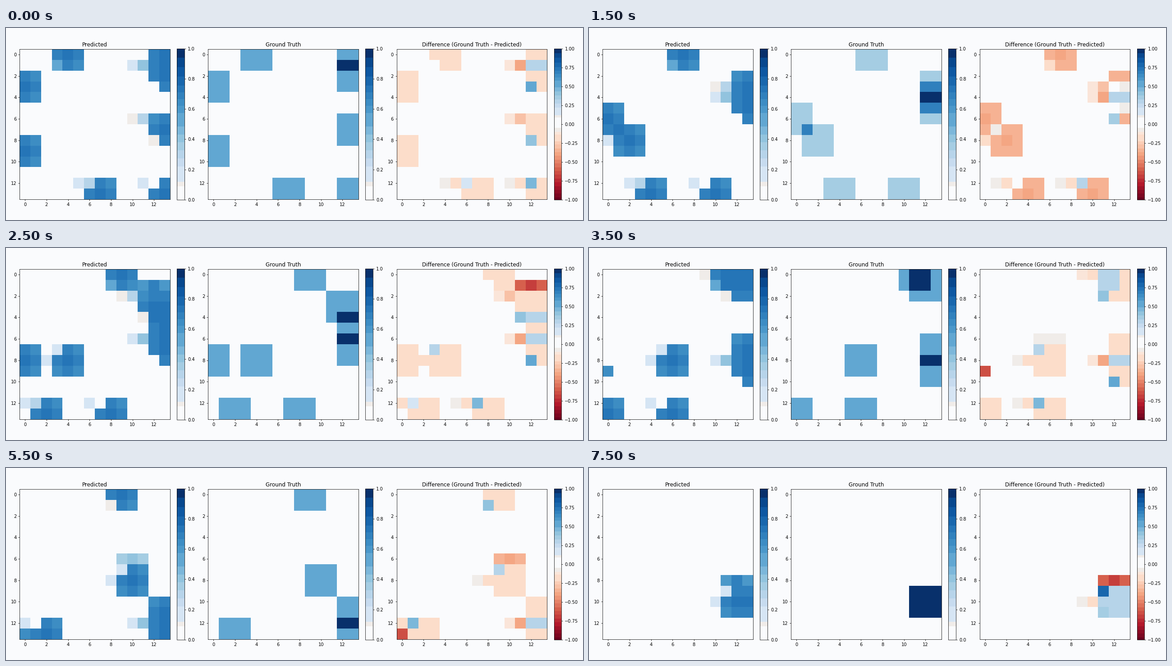
A matplotlib script that plays this animation: 1280 px wide and 427 px high, repeating every 8 s.

```python
import numpy as np
import matplotlib.pyplot as plt
from matplotlib.animation import FuncAnimation
from matplotlib.colors import ListedColormap

W, H, DPI = 1280, 427, 64
FRAMES, STEP_MS, N = 16, 500, 14
PT = 10 / 9  # size of one layout point at this dpi
PAPER = np.array([250, 251, 253]) / 255
GREY = np.array([240, 236, 233]) / 255

plt.rcParams.update({
    "font.family": "DejaVu Sans", "font.size": 10 * PT,
    "axes.titlesize": 12 * PT, "axes.titlepad": 6 * PT,
    "axes.linewidth": 0.8 * PT,
})
for axis in ("xtick", "ytick"):
    plt.rcParams.update({f"{axis}.major.size": 3.5 * PT,
                         f"{axis}.major.width": 0.8 * PT,
                         f"{axis}.major.pad": 3.5 * PT})

# Stepped colours: blue for positive values, red for negative ones.
BLUE_EDGES = np.r_[0, .09, .118, np.linspace(.22, .485, 6),
                   np.linspace(.575, .755, 5), np.linspace(.816, 1, 4)]
RED_EDGES = np.r_[0, .05, .1, .14, .225, np.arange(.27, 1, .05), 1]


def band_color(v):
    edges = BLUE_EDGES if v >= 0 else RED_EDGES
    i = np.searchsorted(edges, abs(v), side="right") - 1
    if i < 2:
        return (PAPER, GREY)[i]
    mid = 1.0 if i == len(edges) - 2 else (edges[i] + edges[i + 1]) / 2
    rgba = plt.cm.Blues(mid) if v >= 0 else plt.cm.RdBu((1 - mid) / 2)
    return np.array(rgba[:3])


def stepped_cmap(lo, hi, n=1000):
    mids = lo + (np.arange(n) + .5) * (hi - lo) / n
    return ListedColormap([band_color(v) for v in mids])


class Mover:
    """A 3x3 block on a path of (step, x, y) and the forecast errors around it.

    weak: (dx, dy, value) of a badly forecast corner
    wake: (dy, value) of a fading streak to the left
    halo: (first step, value, growth) of a false row above
    """

    def __init__(self, *path, weak=None, wake=None, halo=None):
        self.t, self.x, self.y = zip(*path)
        self.weak, self.wake, self.halo = weak, wake, halo

    def at(self, k):
        return round(np.interp(k, self.t, self.x)), round(np.interp(k, self.t, self.y))

    def ghosts(self, k):
        """False detections as (x, y, value)."""
        x, y = self.at(k)
        age = k - self.t[-1]
        if age > 0:
            if x == 0 and age <= 4:
                yield x, y, .65
            return
        if self.wake:
            dy, value = self.wake
            for i in range(3):
                yield x - 2 - i, y + dy, value * .35 ** i
        if self.halo and k >= self.halo[0]:
            start, value, growth = self.halo
            for dx in (-1, 0, 1):
                yield x + dx, y - 2, (value + growth * (k - start)) * .87 ** abs(dx)


MOVERS = [
    Mover((0, 4, 0), (9, 13, 0), weak=(-1, 1, .52)),
    Mover((0, 13, 0), (13, 13, 13), wake=(1, .4)),
    Mover((0, 13, 2), (11, 13, 13), weak=(-1, 1, 0)),
    Mover((0, 0, 3), (6, 0, 9)),
    Mover((0, 13, 7), (3, 13, 4), (4, 12, 4), (7, 12, 1), (9, 10, 1),
          (10, 10, 0), (11, 9, 0), weak=(-1, 1, .1), wake=(-1, .3),
          halo=(4, .7, 0)),
    Mover((0, 0, 9), (1, 0, 8), (13, 12, 8), (15, 12, 10),
          weak=(-1, -1, .2), wake=(0, .2), halo=(7, .08, .075)),
    Mover((0, 7, 13), (7, 0, 13), weak=(-1, -1, .3), wake=(-1, .2)),
    Mover((0, 13, 13), (11, 2, 13), weak=(-1, -1, .05), wake=(-1, .2)),
]


def inside(x, y):
    return 0 <= x < N and 0 <= y < N


def grids(k):
    live = [m for m in MOVERS if k <= m.t[-1]]
    count = np.zeros((N, N))
    for m in live:
        x, y = m.at(k)
        count[max(y - 1, 0):y + 2, max(x - 1, 0):x + 2] += 1

    # Confidence drops where a covered cell has open sides.
    c = np.pad(count > 0, 1, constant_values=True).astype(int)
    sides = c[:-2, 1:-1] + c[2:, 1:-1] + c[1:-1, :-2] + c[1:-1, 2:]
    pred = np.where(count > 0, .6 + .03 * sides, 0)

    for m in live:
        if m.weak:
            x, y = np.add(m.at(k), m.weak[:2])
            if inside(x, y) and count[y, x] == 1:
                pred[y, x] = m.weak[2]
    for m in MOVERS:
        for x, y, value in m.ghosts(k):
            if inside(x, y) and count[y, x] == 0:
                pred[y, x] = max(pred[y, x], value)

    truth = count / count.max()
    return pred, truth, truth - pred


fig = plt.figure(figsize=(W / DPI, H / DPI), dpi=DPI, facecolor=PAPER)


def add_axes(x, top, width, height):
    return fig.add_axes([x / W, 1 - (top + height) / H, width / W, height / H])


def panel(i, title, lo, tick_step):
    x = 30.25 + 418.2 * i
    ax = add_axes(x, 46.9, 333.8, 333.8)
    im = ax.imshow(np.zeros((N, N)), cmap=stepped_cmap(lo, 1), vmin=lo, vmax=1,
                   aspect="auto", interpolation="nearest")
    ax.set_title(title)
    ax.set_xticks(range(0, N, 2))
    ax.set_yticks(range(0, N, 2))
    bar = fig.colorbar(im, cax=add_axes(x + 349, 45.8, 16.8, 336))
    bar.set_ticks(np.arange(lo, 1.01, tick_step))
    return im


images = [
    panel(0, "Predicted", 0, .2),
    panel(1, "Ground Truth", 0, .2),
    panel(2, "Difference (Ground Truth - Predicted)", -1, .25),
]


def update(k):
    for im, grid in zip(images, grids(k)):
        im.set_data(grid)
    return images


anim = FuncAnimation(fig, update, frames=FRAMES, interval=STEP_MS,
                     repeat=True, repeat_delay=0, blit=False)
plt.show()
```
